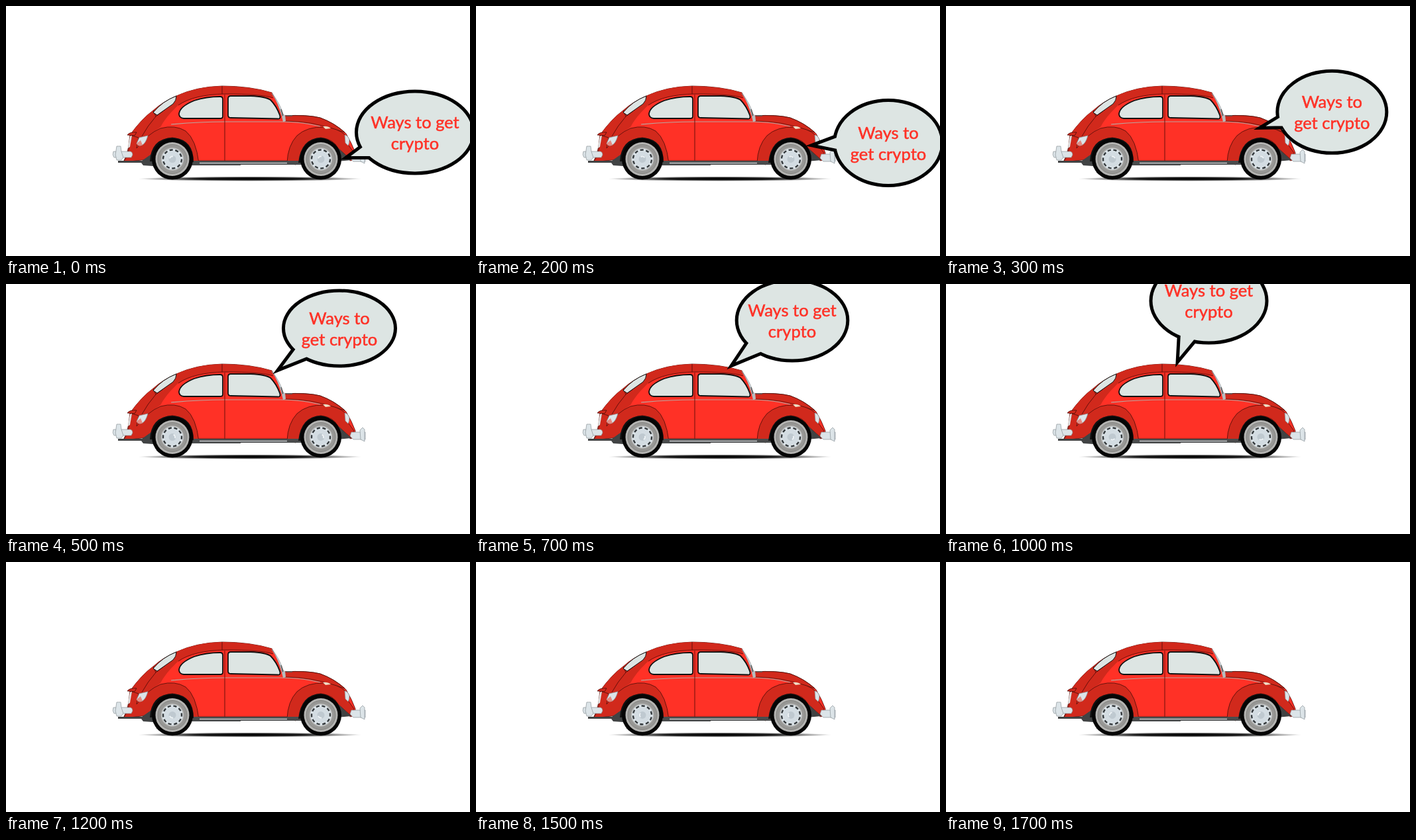
These frames come from a looping animation (700 by 378 pixels, 1800 ms). An HTML page:

```html
<!DOCTYPE html>
<html lang="en">
<head>
<meta charset="utf-8">
<title>Car with speech bubble</title>
<style>
  html, body { margin: 0; width: 100%; height: 100%; overflow: hidden; background: #fff; }
  svg { display: block; width: 100vw; height: 100vh; }
  .bright { fill: #ff3126; }
  .dark { fill: #d1291c; }
  .edge { stroke: #4a0d08; stroke-width: .8; }
  .glass { fill: #dde5e3; stroke: #111; stroke-width: 1.8; }
  .chrome { fill: #dce4e8; stroke: #8b9499; stroke-width: .7; }
  .line { fill: none; stroke: #5c0d08; stroke-width: .9; }
  .trim { fill: none; stroke: #b9a49e; stroke-width: 1.2; }
  text { font: 25.5px Lato, "Open Sans", sans-serif; fill: #ff3126; stroke: #ff3126; stroke-width: .5; text-anchor: middle; }
</style>
</head>
<body>
<svg viewBox="0 0 700 378">
  <defs>
    <radialGradient id="shade">
      <stop offset="0"/>
      <stop offset=".5" stop-color="#000" stop-opacity=".9"/>
      <stop offset="1" stop-color="#000" stop-opacity="0"/>
    </radialGradient>
    <g id="hub">
      <circle r="16" fill="#dbe3e8"/>
      <circle r="14" fill="none" stroke="#33383b" stroke-width="2.4" pathLength="120" stroke-dasharray="7 5"/>
      <circle r="12" fill="#d3dce2"/>
      <circle r="5.5" fill="#bfc9d0"/>
      <path d="M-4-1A4 4 0 0 1 1-4" fill="none" stroke="#eef3f6" stroke-width="2"/>
    </g>
    <g id="tyre">
      <circle r="31" fill="#050505"/>
      <circle r="25.5" fill="#b4b4b2"/>
      <circle r="22" fill="#979795" stroke="#82827f"/>
      <circle r="17.5" fill="#b4b4b2"/>
    </g>
  </defs>

  <ellipse cx="368" cy="261.3" rx="169" ry="3.6" fill="url(#shade)"/>

  <!-- body -->
  <path class="bright edge" d="M177 236Q183 225 185 212L187 195Q205 170 222 158Q236 145 257 136Q287 122 326 121Q368 121 401 131Q413 149 419 166Q455 164 474 169Q498 178 513 193Q522 208 527 222Q527 232 520 234L500 222 447 205 438 239 424 234H292L277 236 222 205 205 232Z"/>
  <path class="dark" d="M187 195Q205 170 222 158Q236 145 257 136Q287 122 326 121Q368 121 401 131L403 139Q385 133 330 133Q283 134 260 150Q242 166 233 183L213 197 197 201Z"/>
  <path class="line" d="M260 150Q283 134 330 133Q385 133 403 139M326 121V133M257 136Q252 149 226 167Q213 182 205 197M222 158L226 167"/>
  <path class="dark edge" d="M419 166Q455 164 474 169Q494 176 511 191L497 187Q460 174 421 174Z"/>
  <path class="trim" d="M249 179Q290 175 330 175H414Q447 175 474 182"/>
  <path class="line" d="M330 134V234"/>

  <!-- fenders -->
  <path class="dark edge" d="M197 215Q214 193 233 185Q255 179 271 189Q287 202 291 238L283 237Q280 203 251 199Q224 201 217 231L205 233 177 236Q185 226 186 210L190 196 200 199Z"/>
  <path class="dark edge" d="M424 237Q425 211 439 196Q454 182 481 183Q501 185 512 195L515 208 525 222 520 232 501 215Q494 201 475 199Q450 201 443 235L437 240Z"/>

  <!-- underbody -->
  <path d="M169 234L205 234 222 222V242L207 241 204 237H169Z" fill="#414344"/>
  <path d="M282 234H448V240H354V241H276Z" fill="#4a4c4d"/>
  <path d="M500 214L521 233 500 235Z" fill="#414344"/>
  <path d="M217 235Q219 200 251 199Q283 201 283 236ZM441 237Q445 200 475 199Q499 201 505 235Z" fill="#111"/>
  <path d="M292 237.5H424" stroke="#c6cbcd" stroke-width="1.5"/>

  <!-- glass -->
  <path class="glass" d="M261 163Q262 152 284 143Q302 137 323 137 327 137 327 141V167Q327 170 323 170H268Q261 169 261 163Z"/>
  <path class="glass" d="M335 140Q335 136 339 136H369Q392 137 399 142 408 151 413 165 415 171 410 170.5L339 169Q335 169 335 165Z"/>
  <path class="glass" style="stroke-width: 1" d="M222 161Q236 144 257 136Q257 143 252 148L228 165Z"/>
  <path class="chrome" d="M401 132Q412 145 417 161L419 166 416 166Q411 147 401 132Z"/>
  <path d="M415 156L419 171M423 166H432" stroke="#5e5b5b" stroke-width="1.6"/>
  <path d="M416 167L421 164 422 174 418 175Z" fill="#b7bcbe"/>

  <!-- lights and bumpers -->
  <path class="dark edge" d="M183 195Q187 190 197 191L194 196Z"/>
  <path d="M187 197L190 196 187 213 184 215Z" fill="#e2e2e2"/>
  <path class="chrome" d="M201 199L214 196Q211 207 206 210 200 213 197 208Z"/>
  <path d="M197 208L203 203 206 210Q200 213 197 208Z" fill="#e58a80"/>
  <path d="M478 182Q485 181 490 185L482 186Z" fill="#f1ddc4"/>
  <path class="chrome" d="M511 195Q516 196 518 202 518 208 516 211L512 207Z"/>
  <path class="chrome" d="M162 220H188Q191 221 191 225L189 229H163Q160 225 162 220Z"/>
  <path class="chrome" d="M167 212H173L174 220 177 229 174 233H167L165 225Z"/>
  <path class="chrome" d="M521 224H542V235H524L519 230Z"/>
  <path class="chrome" d="M534 221L538 217 541 220V238L535 235Z"/>

  <use href="#tyre" x="251" y="231.5"/>
  <use href="#tyre" x="475" y="231.5"/>
  <use href="#hub" class="hub" data-x="251"/>
  <use href="#hub" class="hub" data-x="475"/>

  <g id="bubble">
    <path id="outline" fill="#dde5e3" stroke="#000" stroke-width="10" stroke-miterlimit="12" paint-order="stroke"/>
    <text id="top"></text>
    <text id="bottom"></text>
  </g>
</svg>
<script>
const $ = id => document.getElementById(id);
const LOOP = 1800, STEP = 100;

// step, centre x y, radii, tail: first joint, tip, second joint
const poses = [
  [0, 617, 191, 86, 59.5, 540, 212, 520, 227, 555, 227],
  [2, 622, 207, 79, 62, 547, 198, 515, 210, 549, 217],
  [5, 503, 67, 82, 54.5, 437, 98, 417, 125, 457, 109],
  [8, 464, 49, 81, 60.5, 398, 85, 379, 115, 419, 98],
  [10, 396.5, 25.5, 85, 61, 354, 74, 352, 111, 376, 82],
  [11, 362, 14, 86, 61, 330, 69, 337, 112, 356, 74]
];

function poseAt(step) {
  const i = Math.max(1, poses.findIndex(p => p[0] >= step));
  const a = poses[i - 1], b = poses[i];
  const k = (step - a[0]) / (b[0] - a[0]);
  return a.map((v, j) => v + (b[j] - v) * k).slice(1);
}

function setLine(id, words, x, y) {
  $(id).textContent = words;
  $(id).setAttribute("x", x);
  $(id).setAttribute("y", y);
}

function drawBubble(step) {
  const visible = step < 12;
  $("bubble").style.display = visible ? "" : "none";
  if (!visible) return;
  const [x, y, rx, ry, ...tail] = poseAt(step);
  $("outline").setAttribute("d",
    `M${x - rx} ${y}a${rx} ${ry} 0 1 0 ${2 * rx} 0a${rx} ${ry} 0 1 0 ${-2 * rx} 0ZM${tail.join(" ")}Z`);
  const narrow = step > 0 && step < 7;
  setLine("top", narrow ? "Ways to" : "Ways to get", x, y - 6.5);
  setLine("bottom", narrow ? "get crypto" : "crypto", x, y + 25.5);
}

function frame(now) {
  const step = Math.floor(now % LOOP / STEP);
  drawBubble(step);
  for (const hub of document.querySelectorAll(".hub"))
    hub.setAttribute("transform", `translate(${hub.dataset.x} 231.5) rotate(${step * 20})`);
  requestAnimationFrame(frame);
}
frame(performance.now());
</script>
</body>
</html>
```
